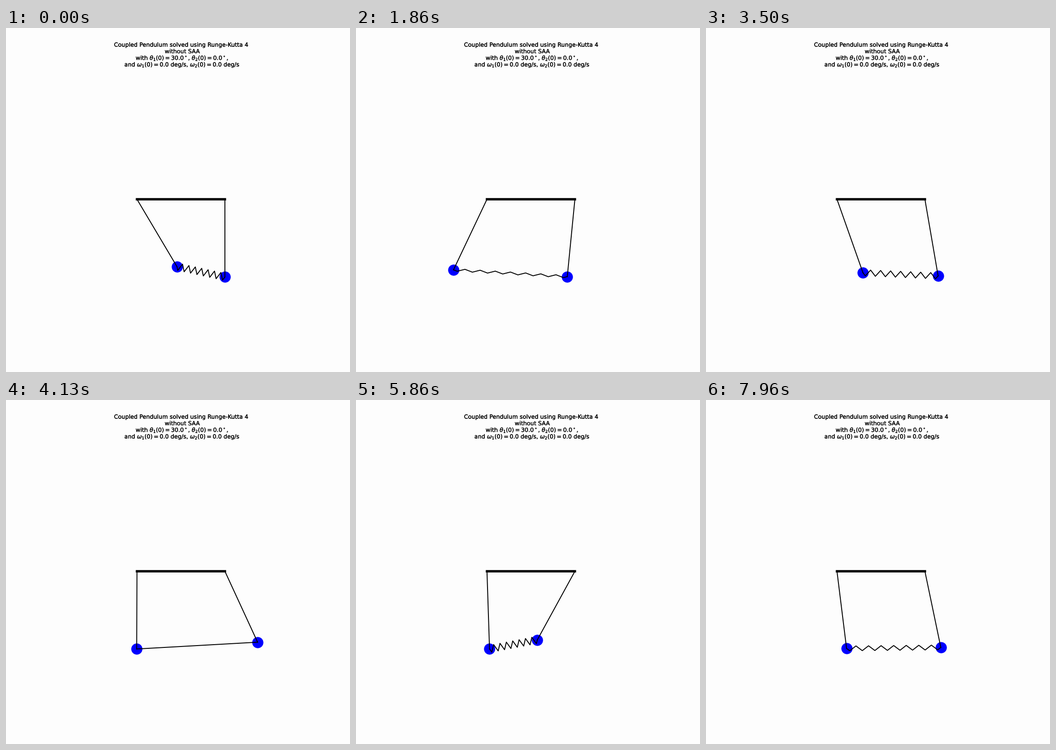
A matplotlib script for the animation above (8 s loop, 748 by 748 pixels).

```python
import numpy as np
import matplotlib.pyplot as plt
from matplotlib.animation import FuncAnimation
from matplotlib.patheffects import withStroke

SIZE = 748
FPS, POSES = 30, 240
TICK = 20            # ms per drawn frame
SUBSTEPS = 4
GRAVITY = 2.941      # g / L
COUPLING = 0.8795    # k / m
GAP = 1.1            # distance between the pivots, rod length is 1
NODES, WIDTH = 15, 0.1
PIVOTS = np.array([[0, 0], [GAP, 0]])
TITLE = [
    "Coupled Pendulum solved using Runge-Kutta 4 ",
    "without SAA",
    r"with $\theta_1(0) = 30.0^\circ$, $\theta_2(0) = 0.0^\circ$,",
    r"and $\omega_1(0) = 0.0$ deg/s, $\omega_2(0) = 0.0$ deg/s",
]


def deriv(state):
    th, om = state
    pull = COUPLING * (th[0] - th[1]) * np.array([-1, 1])
    return np.array([om, -GRAVITY * np.sin(th) + pull])


def rk4(state, h):
    k1 = deriv(state)
    k2 = deriv(state + h / 2 * k1)
    k3 = deriv(state + h / 2 * k2)
    k4 = deriv(state + h * k3)
    return state + h / 6 * (k1 + 2 * k2 + 2 * k3 + k4)


def solve():
    state = np.array([[np.radians(30), 0], [0, 0]])
    angles = []
    for _ in range(POSES):
        angles.append(state[0])
        for _ in range(SUBSTEPS):
            state = rk4(state, 1 / (FPS * SUBSTEPS))
    return np.array(angles)


def spring(start, end):
    """Zigzag of constant wire length between two points."""
    span = end - start
    length = np.hypot(*span)
    along = span / length
    normal = np.array([-along[1], along[0]])
    amp = np.sqrt(max(0, WIDTH**2 - (length / NODES)**2)) / 2
    i = np.arange(1, NODES + 1)[:, None]
    zigzag = start + span * (2 * i - 1) / (2 * NODES) + amp * (-1.0)**i * normal
    return np.vstack([start, zigzag, end])


angles = solve()

fig = plt.figure(figsize=(10, 10), dpi=SIZE / 10, facecolor="#fdfdfd")
ax = fig.add_axes([0.125, 0.11, 0.775, 0.77])
ax.set_xlim(-1.1007, 2.2348)
ax.set_ylim(-1.7356, 1.6724)
ax.axis("off")

for row, line in enumerate(TITLE):
    baseline = 40.6 + 14.35 * row
    fig.text(0.5125, 1 - baseline / SIZE, line, ha="center", va="baseline",
             fontsize=12, fontfamily="DejaVu Sans",
             path_effects=[withStroke(linewidth=0.25, foreground="k")])

ax.plot(PIVOTS[:, 0], PIVOTS[:, 1], "k", lw=5, snap=False)
rods = [ax.plot([], [], "k", lw=1.9, snap=False)[0] for _ in PIVOTS]
coil, = ax.plot([], [], "k", lw=1.9, snap=False)
bobs = ax.scatter(PIVOTS[:, 0], PIVOTS[:, 1], s=500, color="b", zorder=1)


def draw(n):
    # a pose starts at its time cut down to whole hundredths of a second
    hundredths = n * TICK // 10
    th = angles[(3 * hundredths + 2) // 10]
    pos = PIVOTS + np.column_stack([np.sin(th), -np.cos(th)])
    for rod, pivot, bob in zip(rods, PIVOTS, pos):
        rod.set_data([pivot[0], bob[0]], [pivot[1], bob[1]])
    coil.set_data(*spring(*pos).T)
    bobs.set_offsets(pos)
    return [*rods, coil, bobs]


anim = FuncAnimation(fig, draw, frames=POSES * 1000 // (FPS * TICK),
                     interval=TICK, repeat=True, repeat_delay=0)
plt.show()
```
